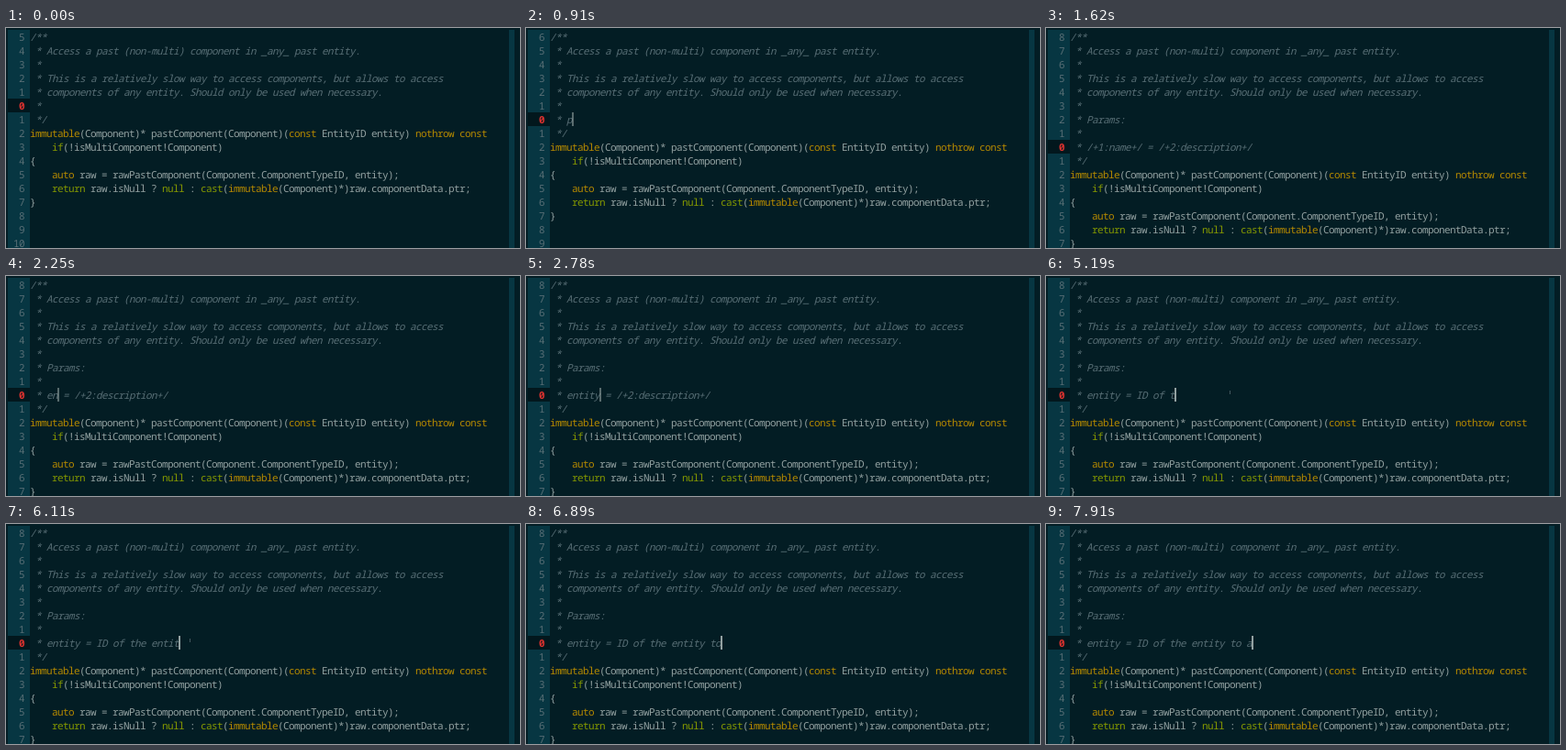
These frames come from a looping animation (560 px wide and 240 px high, 8 s). An HTML page:

```html
<!DOCTYPE html>
<html lang="en">
<head>
<meta charset="utf-8">
<title>Editor: documenting a parameter</title>
<style>
html, body { margin: 0; width: 100%; height: 100%; overflow: hidden; background: #031d24; }
#stage { position: relative; width: 560px; height: 240px; overflow: hidden; background: #031d24; }
#rows, #probe {
  font: 11px/17px "Noto Sans Mono", "DejaVu Sans Mono", monospace;
  font-variant-ligatures: none;
  text-rendering: geometricPrecision;
  white-space: pre;
}
#rows { position: absolute; left: 2px; top: 2px; color: #93a1a1; }
#probe { position: absolute; visibility: hidden; }
.row { display: flex; height: 15px; }
.num { width: 24px; color: #586e75; background: #073642; }
.now { color: #dc322f; background: #02171d; font-weight: bold; }
.note { color: #586e75; font-style: italic; }
.type { color: #b58900; }
.word { color: #859900; }
.sel { color: #031d24; background: #586e75; }
#margin { position: absolute; left: 548px; top: 2px; width: 6px; bottom: 0; background: #073642; }
#cursor { position: absolute; height: 15px; background: #93a1a1; }
#speck { position: absolute; left: 200px; top: 125px; width: 1px; height: 4px; background: #43585f; }
</style>
</head>
<body>
<div id="stage">
  <div id="margin"></div>
  <div id="rows"></div>
  <div id="speck"></div>
  <div id="cursor"></div>
  <span id="probe"></span>
</div>
<script>
const LOOP = 8000, CELL = 6, ROW = 15, LEFT = 26, TOP = 2, LAG = 40;
const $ = id => document.getElementById(id);

const head = [
  '/**',
  ' * Access a past (non-multi) component in _any_ past entity.',
  ' *',
  ' * This is a relatively slow way to access components, but allows to access',
  ' * components of any entity. Should only be used when necessary.',
  ' *'
];
const body = [
  ' */',
  'immutable(Component)* pastComponent(Component)(const EntityID entity) nothrow const',
  '    if(!isMultiComponent!Component)',
  '{',
  '    auto raw = rawPastComponent(Component.ComponentTypeID, entity);',
  '    return raw.isNull ? null : cast(immutable(Component)*)raw.componentData.ptr;',
  '}', '', '', ''
];

// Lines between head and body: none, the new line, or the expanded snippet
const added = [() => [], line => [line], line => [' * Params:', ' *', line]];

// Timeline of editor states
const steps = [];
let state = {
  mode: 0, text: ' *', tail: '', cursor: -1, width: 2, dim: false, sel: null, speck: false
};
function at(time, change) {
  state = { ...state, ...change };
  steps.push({ time, ...state });
}
// The cursor is faint when a key lands and full a moment later
function press(time, text, change = {}) {
  at(time, { text, cursor: text.length, dim: true, sel: null, ...change });
}
function edit(time, text, change) {
  press(time, text, change);
  at(time + LAG, { dim: false });
}
function type(chars, times) {
  times.forEach((time, i) => edit(time, state.text + chars[i]));
}

const second = '/+2:description+/';
at(0, {});
at(100, { cursor: 2, width: CELL });
edit(600, ' * ', { mode: 1, width: 2 });
type('par', [910, 1020, 1250]);
at(1530, { mode: 2, text: ' * /+1:name+/', tail: ' = ' + second, cursor: -1 });
at(1660, { sel: [3, 13] });
edit(2110, ' * e');
type('ntit', [2230, 2350, 2470, 2600]);
press(2780, ' * entity');
at(3140, { cursor: -1 });
at(3180, { sel: [12, 12 + second.length] });
edit(3670, ' * entity = I', { tail: '', speck: true });
type('D p', [3780, 4000, 4150]);
edit(4460, ' * entity = ID ');
type('of the e', [4640, 4890, 5020, 5150, 5270, 5390, 5510, 5630]);
type('ntity', [5750, 5860, 5970, 6070, 6230]);
edit(6500, state.text + ' ', { speck: false });
type('to', [6700, 6850]);
at(7330, { cursor: -1 });
at(7580, { cursor: state.text.length });
type(' a', [7680, 7870]);

const span = (name, text) => `<span class="${name}">${text}</span>`;

function paint(line, sel) {
  if (/^(\/\*| \*)/.test(line)) {
    if (sel) {
      const [a, b] = sel;
      line = line.slice(0, a) + span('sel', line.slice(a, b)) + line.slice(b);
    }
    return span('note', line);
  }
  return line.replace(/\b(?:(immutable|const|nothrow|auto)|if|return|null|cast)\b/g,
    (word, type) => span(type ? 'type' : 'word', word));
}

function show(s) {
  const extra = added[s.mode](s.text + s.tail);
  const now = head.length + extra.length - 1;
  const lines = [...head, ...extra, ...body].slice(0, 16);
  $('rows').innerHTML = lines.map((line, i) => {
    const num = String(Math.abs(i - now)).padStart(3) + ' ';
    return '<div class="row">' + span(i === now ? 'num now' : 'num', num) +
      `<span>${paint(line, i === now ? s.sel : null)}</span></div>`;
  }).join('');
  const bar = $('cursor').style;
  bar.display = s.cursor < 0 ? 'none' : 'block';
  bar.left = LEFT + s.cursor * CELL + 'px';
  bar.top = TOP + now * ROW + 'px';
  bar.width = s.width + 'px';
  bar.opacity = s.dim ? 0.6 : 1;
  $('speck').style.display = s.speck ? 'block' : 'none';
}

// Keep the type on the terminal's character grid
$('probe').textContent = 'm'.repeat(100);
$('rows').style.letterSpacing = CELL - $('probe').getBoundingClientRect().width / 100 + 'px';

const start = performance.now();
let shown = null;
function tick() {
  const time = (performance.now() - start) % LOOP;
  const step = steps.findLast(s => s.time <= time) || steps[0];
  if (step !== shown) show(shown = step);
  requestAnimationFrame(tick);
}
tick();
</script>
</body>
</html>
```
